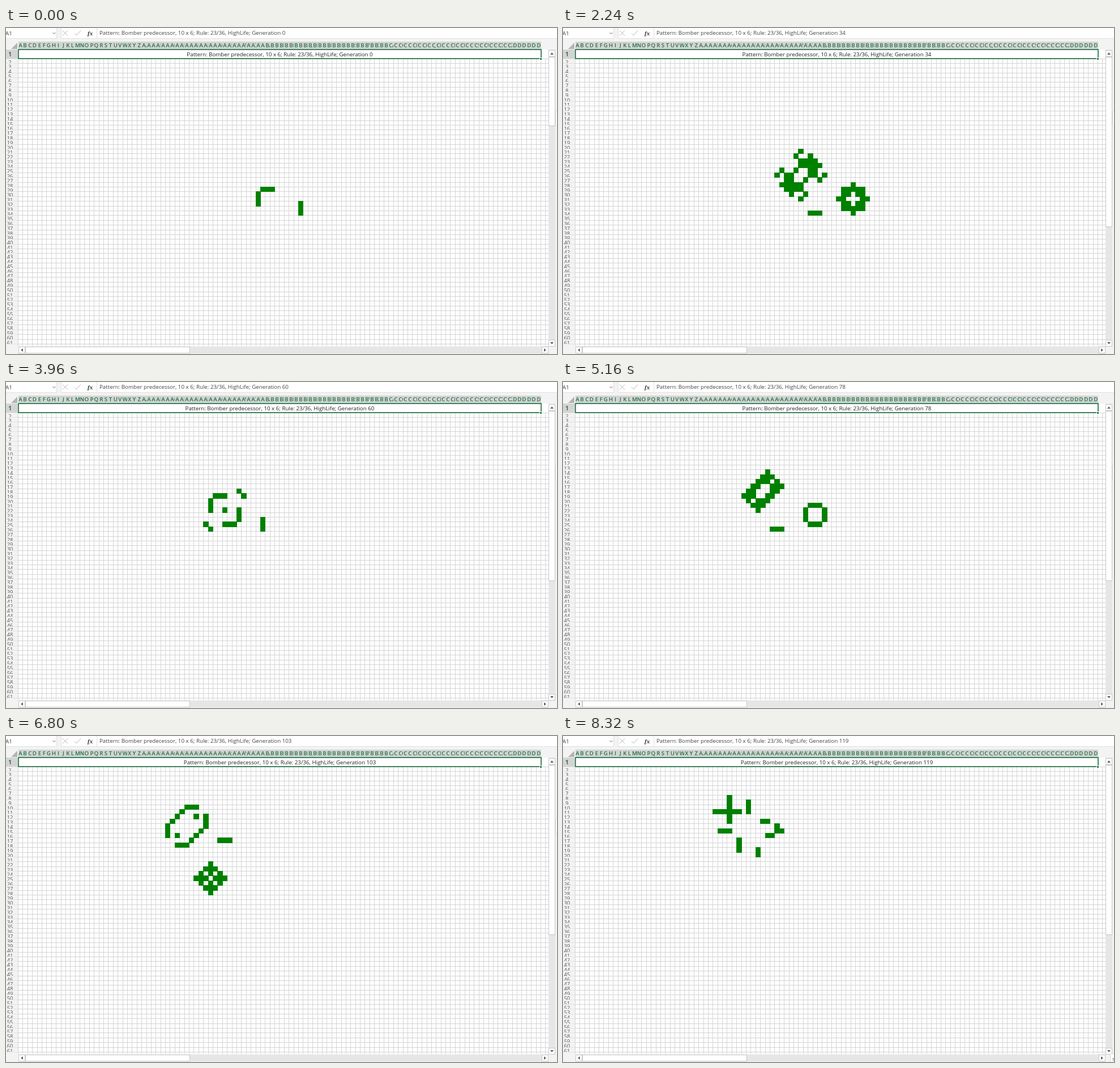
Write an HTML page that moves like this. It is 973 px wide and 575 px high and loops after 8360 ms.

```html
<!DOCTYPE html>
<html lang="en">
<head>
<meta charset="utf-8">
<title>HighLife</title>
<style>
  html, body { margin: 0; width: 100%; height: 100%; overflow: hidden; background: #f3f3f3; }
  svg { display: block; }
  text { font-family: "Open Sans", "Noto Sans", sans-serif; font-size: 9.76px; }
</style>
</head>
<body>
<svg id="stage" width="973" height="575" viewBox="0 0 973 575"></svg>
<script>
const NS = "http://www.w3.org/2000/svg";
const stage = document.getElementById("stage");
const LOOP = 8360, TICK = 40, LAST = 119;
const PITCH = 8.39, LEFT = 21.5, TOP = 54, COLS = 110, ROWS = 61;
const GREEN = "#217346";

const colX = c => Math.floor(LEFT + c * PITCH);
const rowY = r => Math.floor(TOP + (r - 2) * PITCH);

function add(tag, attrs, parent = stage) {
  const el = document.createElementNS(NS, tag);
  for (const key in attrs) el.setAttribute(key, attrs[key]);
  parent.appendChild(el);
  return el;
}
const box = (x, y, w, h, fill, parent) => add("rect", { x, y, width: w, height: h, fill }, parent);
const framed = (x, y, w, h, fill, stroke) =>
  add("rect", { x: x + .5, y: y + .5, width: w - 1, height: h - 1, fill, stroke });
const line = (d, stroke, width = 1) =>
  add("path", { d, stroke, fill: "none", "stroke-width": width });
const shape = (d, fill) => add("path", { d, fill });
function label(str, x, y, fill, attrs = {}, parent = stage) {
  const el = add("text", { x, y, fill, ...attrs }, parent);
  el.textContent = str;
  return el;
}
const clipBox = (x, y, width, height) => add("svg", { x, y, width, height, overflow: "hidden" });

function drawFormulaBar() {
  box(0, 0, 973, 575, "#f3f3f3");
  box(0, 0, 90, 18, "#fff");
  box(97, 0, 63, 18, "#fff");
  box(161, 0, 812, 18, "#fff");
  line("M0 18.5H90M97 18.5H973M89.5 0V18M97.5 0V18M160.5 0V18", "#e0e0e0");
  label("A1", -1, 12.5, "#444");
  line("M82.5 8L85 10.5L87.5 8", "#666");
  line("M100 4.5L109 13.5M109 4.5L100 13.5", "#b5b5b5");
  line("M121 9.5L124.5 13L132 4.5", "#b5b5b5");
  label("fx", 144, 12.5, "#333", {
    style: "font: italic bold 11px 'Liberation Serif', 'Noto Serif', serif"
  });
}

function columnName(c) {
  const letter = n => String.fromCharCode(65 + n);
  return c < 26 ? letter(c) : letter(Math.floor(c / 26) - 1) + letter(c % 26);
}

function drawHeaders() {
  box(22, 24, 923, 14, "#d4d4d4");
  box(0, 38, 21, 16, "#d4d4d4");
  shape("M20 26V37H9Z", "#b4b4b4");
  for (let c = 0; c < COLS; c++) {
    const name = columnName(c), x = colX(c);
    const cell = clipBox(x, 24, colX(c + 1) - x, 14);
    const single = name.length === 1;
    label(name, single ? 4.4 : 1.2, 10.2, GREEN, {
      "font-weight": 600, "text-anchor": single ? "middle" : "start"
    }, cell);
  }
  label("1", 7, 50.4, GREEN, { "font-weight": 700, "text-anchor": "middle" });
  for (let r = 2; r <= ROWS; r++) {
    const cell = clipBox(0, rowY(r), 21, rowY(r + 1) - rowY(r));
    label(r, 7, 9.6, "#555", { "text-anchor": "middle", style: "font-size:9.4px" }, cell);
  }
}

function drawGrid() {
  box(21, 38, 937, 523, "#fff");
  let d = "";
  for (let c = 0; c <= COLS + 1; c++) d += `M${colX(c) + .5} 54V561`;
  for (let r = 2; r <= ROWS + 1; r++) d += `M21 ${rowY(r) + .5}H958`;
  line(d, "#d4d4d4");
  let ticks = "";
  for (let r = 2; r <= ROWS + 1; r++) ticks += `M0 ${rowY(r) + .5}H21`;
  line(ticks, "#e3e3e3");
}

function drawSelection() {
  add("rect", { x: 22, y: 38, width: 923, height: 16, fill: "#fff", stroke: GREEN, "stroke-width": 1.7 });
  box(942, 52, 5, 5, "#fff");
  box(943, 53, 3, 3, GREEN);
}

function drawScrollBars() {
  box(958, 38, 12, 524, "#e6e6e6");
  framed(958, 39, 12, 12, "#fff", "#c6c6c6");
  framed(958, 550, 12, 12, "#fff", "#c6c6c6");
  shape("M961 47H967L964 43Z", "#666");
  shape("M961 554H967L964 558Z", "#666");
  box(22, 562, 936, 12, "#e6e6e6");
  framed(22, 562, 12, 12, "#fff", "#c6c6c6");
  framed(946, 562, 12, 12, "#fff", "#c6c6c6");
  framed(34, 562, 291, 12, "#fff", "#c6c6c6");
  shape("M30 565V571L26 568Z", "#666");
  shape("M950 565V571L954 568Z", "#666");
}

drawFormulaBar();
drawGrid();
drawHeaders();
drawSelection();
drawScrollBars();

const thumb = framed(958, 51, 12, 121, "#fff", "#c6c6c6");
const sideTab = add("rect", { x: 970.5, y: 146.5, width: 8, height: 26, rx: 2, fill: "#fff", stroke: "#d8d8d8" });
const cornerTip = add("g", {});
add("rect", { x: 966.5, y: 560.5, width: 20, height: 20, rx: 2, fill: "#fff", stroke: "#d8d8d8" }, cornerTip);
label("s", 970, 573, "#555", {}, cornerTip);
const cells = shape("", "#008000");
const barText = label("", 165, 12.4, "#444");
const titleText = label("", 483.5, 50.3, "#222", { "text-anchor": "middle" });

// HighLife: survive on 2 or 3 neighbours, birth on 3 or 6.
const WIDE = 256;
const key = (c, r) => r * WIDE + c;
const AROUND = [-WIDE - 1, -WIDE, -WIDE + 1, -1, 1, WIDE - 1, WIDE, WIDE + 1];

function step(live) {
  const count = new Map();
  for (const k of live)
    for (const o of AROUND) count.set(k + o, (count.get(k + o) || 0) + 1);
  const next = new Set();
  for (const [k, n] of count)
    if (n === 3 || (live.has(k) ? n === 2 : n === 6)) next.add(k);
  return next;
}

function cellPath(live) {
  let d = "";
  for (const k of live) {
    const c = k % WIDE, r = Math.floor(k / WIDE);
    d += `M${colX(c)} ${rowY(r)}H${colX(c + 1) + 1}V${rowY(r + 1) + 1}H${colX(c)}Z`;
  }
  return d;
}

let live = new Set([
  key(51, 29), key(52, 29), key(53, 29),
  key(50, 30), key(50, 31), key(50, 32),
  key(59, 32), key(59, 33), key(59, 34)
]);
const paths = [];
for (let g = 0; g <= LAST; g++) {
  paths.push(cellPath(live));
  live = step(live);
}

// Pace of the run: [generation, ms]
const PACE = [[0, 0], [1, 80], [17, 1145], [26, 1724], [34, 2214], [60, 3921], [78, 5140], [103, 6790], [LAST, 7860]];

function generationAt(t) {
  for (let i = 1; i < PACE.length; i++) {
    const [g0, t0] = PACE[i - 1], [g1, t1] = PACE[i];
    if (t < t1) return Math.floor(g0 + (g1 - g0) * (t - t0) / (t1 - t0) + 1e-6);
  }
  return LAST;
}

let shown = -1;
function render(ms) {
  const t = Math.floor((ms % LOOP) / TICK) * TICK;
  const g = generationAt(t);
  if (g !== shown) {
    shown = g;
    const title = `Pattern: Bomber predecessor, 10 x 6; Rule: 23/36, HighLife; Generation ${g}`;
    barText.textContent = title;
    titleText.textContent = title;
    cells.setAttribute("d", paths[g]);
    thumb.setAttribute("height", g ? 299 : 121);
  }
  sideTab.style.display = t < 8120 ? "" : "none";
  cornerTip.style.display = t < 8320 ? "none" : "";
}

let start = null;
function frame(now) {
  if (start === null) start = now;
  render(now - start);
  requestAnimationFrame(frame);
}
render(0);
requestAnimationFrame(frame);
</script>
</body>
</html>
```
